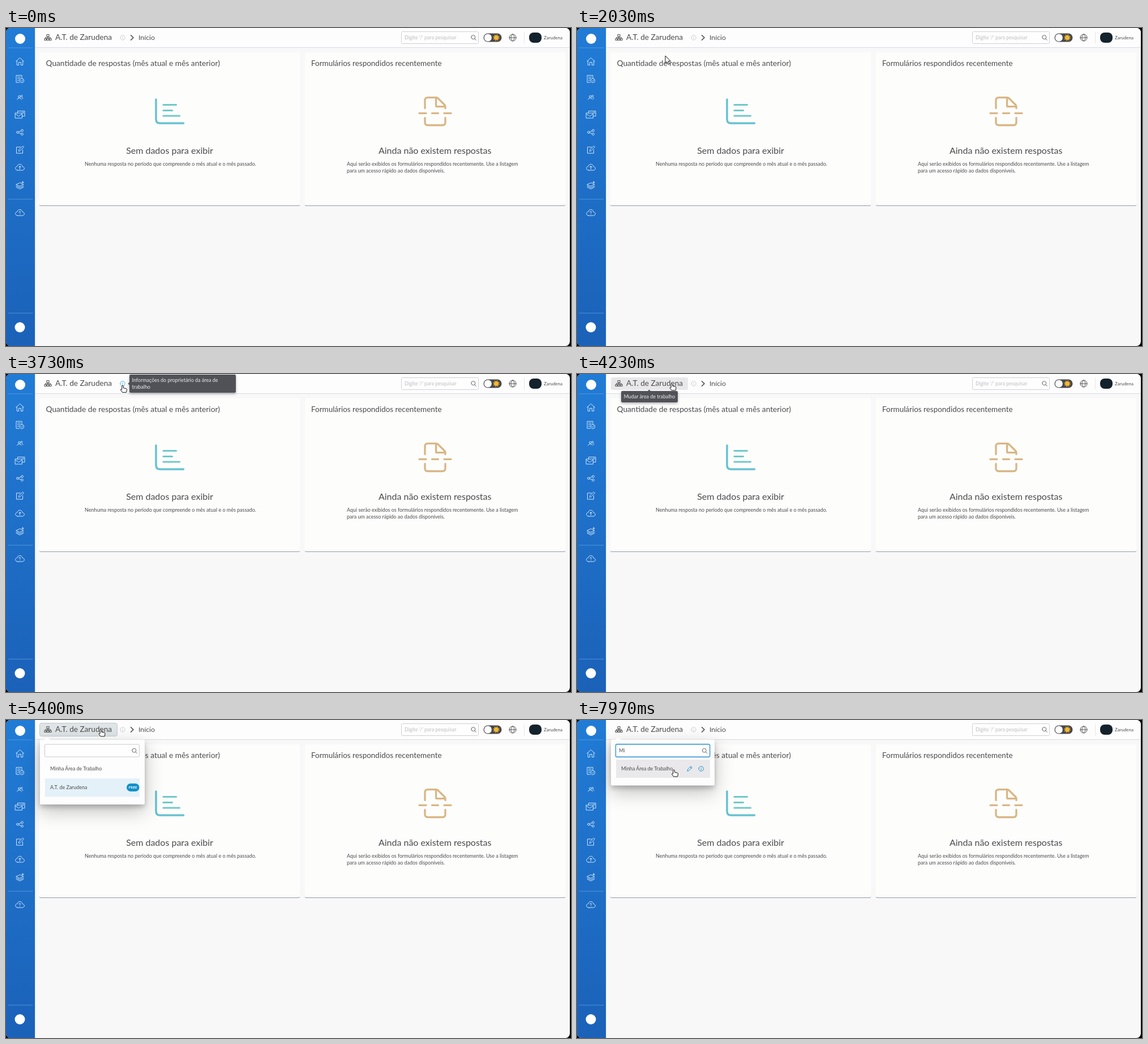
Animation of 998 by 561 pixels, one loop 8000 ms. Source, as an HTML page:

```html
<!DOCTYPE html>
<html lang="pt">
<head>
<meta charset="utf-8">
<title>Início</title>
<style>
html, body { margin: 0; width: 998px; height: 561px; overflow: hidden; background: #000; }
svg { display: block; }
text { font-family: Lato, "Open Sans", sans-serif; fill: #4b4b4d; }
.line { fill: none; stroke-linecap: round; stroke-linejoin: round; }
.card { fill: #fdfdfc; filter: drop-shadow(0 1px .6px rgba(50, 60, 90, .5)); }
.tip { fill: #505257; filter: drop-shadow(0 2px 2px rgba(0, 0, 0, .3)); }
.panel { fill: #fdfdfd; filter: drop-shadow(0 5px 4px rgba(0, 0, 0, .2)) drop-shadow(0 11px 16px rgba(0, 0, 0, .24)); }
</style>
</head>
<body>
<svg id="stage" width="998" height="561" viewBox="0 0 998 561"></svg>
<script>
const LOOP = 8000;
const NAME = 'Zarudena';
const SPACE = 'A.T. de ' + NAME;

const text = (x, y, size, str, extra = '') => `<text x="${x}" y="${y}" font-size="${size}" ${extra}>${str}</text>`;
const rect = (x, y, w, h, fill, extra = '') => `<rect x="${x}" y="${y}" width="${w}" height="${h}" fill="${fill}" ${extra}/>`;
const line = (d, color, width = 1, extra = '') => `<path class="line" d="${d}" stroke="${color}" stroke-width="${width}" ${extra}/>`;
const dot = (x, y, r, fill, extra = '') => `<circle cx="${x}" cy="${y}" r="${r}" fill="${fill}" ${extra}/>`;
const ring = (x, y, r) => `M${x - r} ${y}a${r} ${r} 0 1 0 ${2 * r} 0a${r} ${r} 0 1 0 ${-2 * r} 0`;
const group = (id, body, extra = '') => `<g id="${id}" ${extra}>${body}</g>`;
const glass = (id, x, y) => group(id, line(ring(x - .7, y - .8, 3.5) + `M${x + 2} ${y + 2}l2.4 2.4`, '#666', 1));

// Sidebar icons are drawn around their own centre
const CLOUD = 'M-4 5H4C9 5 9-1 4.5-1.5C4-7-4-7-4.5-2C-9-1.5-9 5-4 5Z';
const ICONS = [
  [59, 'M-7 0L0-6.5L7 0M-5.2-1.5V6.5H-2V1.5H2V6.5H5.2V-1.5'],
  [90, 'M-1 6H-6.5V-6.5H3.5V-1M-4-3.5H1M-4-.5H0M-4 2.5H-2' + ring(3.5, 2.8, 3.7) + 'M2 3L3.2 4.2L5.3 1.7'],
  [122, ring(-1, -1, 1.8) + 'M-5 4Q-4 1.5-1 1.5T3 4' + ring(3, -2, 1.4) + 'M3.5 .5Q5 .7 5.5 2.5'],
  [153, 'M-4-3V-6.5H8.5V2.5H5M-8-3H4V6H-8ZM-8-1.5L-2 2.5L4-1.5M4.5-4.3H6.5V-2.3'],
  [184, ring(-4, 0, 1.9) + ring(4, -3.2, 1.9) + ring(4, 3.2, 1.9) + 'M-2.2-.8L2.2-2.5M-2.2 .8L2.2 2.5'],
  [215, 'M1-5H-6V6H5V0M-2 2L-1.5-.7L5-7L7-5L.6 1.5Z'],
  [246, CLOUD + 'M0 3V-2.5M-2-.5L0-2.5L2-.5'],
  [277, 'M-6.5-1L0-4L6.5-1L0 2ZM-6.5 1.5L0 4.7L6.5 1.5M-6.5 3.7L0 7L6.5 3.7M5-6.5V-3M3.3-4.7H6.8'],
  [326, CLOUD + 'M-1.6-1.3Q-1.2-3.3 .3-2.8Q2.2-1.8 .2-.2V.7M.2 2.6V2.8'],
];

const sidebar = () =>
  rect(0, 0, 51, 561, 'url(#blue)') +
  [35, 302, 503].map(y => line(`M4 ${y}H47`, '#5b9fe0', .8)).join('') +
  dot(25, 19, 9, '#fff') + dot(24.5, 528, 9, '#fff') +
  ICONS.map(([y, d]) => line(d, '#cfe4f8', 1, `transform="translate(24.5 ${y})"`)).join('');

const header = () =>
  rect(51, 0, 947, 34, '#fdfdfd') + line('M51 34.5H998', '#d9dbe2') +
  rect(60, 6, 136, 22, '#e8e8ea', 'id="hover" rx="3"') +
  rect(59.5, 5.5, 137, 23, '#dfe4e6', 'id="active" rx="3" stroke="#bccbcc"') +
  line('M72 11.5h4v3.5h-4ZM68 18.5h3.2v3h-3.2ZM72.4 18.5h3.2v3h-3.2ZM76.8 18.5h3.2v3h-3.2ZM74 15V18.5M69.6 18.5V16.8H78.4V18.5', '#555', 1.1) +
  text(87, 21.3, 13.6, SPACE) +
  group('info', line(ring(206, 17, 4.2) + 'M206 16.7V19M206 15V15.1', 'currentColor', .9)) +
  line('M220.5 12.7L225 17L220.5 21.3', '#444', 1.5) +
  text(234, 21, 12.3, 'Início') +
  rect(698.5, 6.5, 136, 21, '#fefefe', 'rx="2" stroke="#cfd0d6"') +
  text(704, 19.6, 8.9, 'Digite \'/\' para pesquisar', 'style="fill:#bdbdc2"') +
  glass('find', 826, 17) +
  rect(843.5, 9.5, 32, 15, '#47484b', 'rx="7.5"') + dot(851.3, 17, 6.6, '#fdfdfd') +
  dot(866, 17, 4, '#f5b82e') + dot(866, 17, 5, 'none', 'stroke="#f5b82e" stroke-width="1.4" stroke-dasharray="1.6 2.33"') +
  line(ring(895, 17, 6) + 'M889 17H901M895 11C891 14 891 20 895 23C899 20 899 14 895 11', '#555', 1) +
  line('M915.5 7V27', '#e6e6ea') +
  rect(924, 8, 22, 18, '#14222c', 'rx="8"') +
  text(950, 19.6, 7.9, NAME);

const cards = () =>
  [59, 528].map(x => rect(x, 43, 460, 270, '#fdfdfc', 'class="card" rx="2"')).join('') +
  text(70.5, 67, 13.72, 'Quantidade de respostas (mês atual e mês anterior)') +
  text(539, 67, 13.47, 'Formulários respondidos recentemente') +
  line('M265 126V161Q265 168 272 168H313.5', '#66c2d2', 3.5) +
  line('M278 135.5H300.5M278 145.5H293.5M278 155H306.5', '#70c8c9', 3.2) +
  line('M740 141.5V127.5Q740 122.6 745 122.6H760Q761.5 122.6 763 124L774.6 135.5Q776 137 776 138.5V141.5M759.6 123V137Q759.6 138.7 761.3 138.7H775.5M740 158.5V166.6Q740 171.5 745 171.5H771Q776 171.5 776 166.6V158.5M730 150.3H742M752.5 150.3H763.5M774 150.3H786', '#d9b684', 3.3) +
  text(289, 221.7, 16, 'Sem dados para exibir', 'text-anchor="middle"') +
  text(757.7, 221.7, 16, 'Ainda não existem respostas', 'text-anchor="middle"') +
  text(139, 243, 8.96, 'Nenhuma resposta no período que compreende o mês atual e o mês passado.') +
  text(602, 243, 8.96, 'Aqui serão exibidos os formulários respondidos recentemente. Use a listagem') +
  text(602, 255, 8.96, 'para um acesso rápido ao dados disponíveis.');

const white = 'style="fill:#ececee"';
const tooltips = () =>
  group('tipInfo', '<path class="tip" d="M220 1H404Q406 1 406 3V31Q406 33 404 33H220Q218 33 218 31V19.5L215.5 17L218 14.5V3Q218 1 220 1Z"/>' +
    text(222.5, 14, 8.95, 'Informações do proprietário da área de', white) + text(222.5, 26, 8.95, 'trabalho', white)) +
  group('tipSpace', '<path class="tip" d="M80 30H125L127.5 27.5L130 30H176Q178 30 178 32V48Q178 50 176 50H80Q78 50 78 48V32Q78 30 80 30Z"/>' +
    text(128, 43, 8.87, 'Mudar área de trabalho', white + ' text-anchor="middle"'));

const dropdown = () => group('menu',
  rect(60, 34.5, 185, 114.5, '#fdfdfd', 'id="panel" class="panel" rx="2"') +
  '<path d="M67 35L72.5 30.5L78 35Z" fill="#fdfdfd"/>' +
  rect(68, 42.5, 168, 23, 'none', 'id="glow" rx="3" stroke="#c6e0f5" stroke-width="2.4"') +
  rect(68.5, 43, 167, 22, '#fefefe', 'id="field" rx="2"') +
  text(74, 57.3, 9, '', 'id="typed"') + line('', '#333', .9, 'id="caret"') +
  glass('menuFind', 227, 54.5) +
  group('rowHover', rect(69, 70, 166, 32, '#e9e9eb') +
    line('M195 90L195.7 87L201 81.7L203.2 83.8L197.9 89.2ZM199.8 83L202 85.1', '#2c93d0', 1) +
    line(ring(219.3, 86, 4.3) + 'M219.3 85.6V88.2M219.3 83.8V83.9', '#2c93d0', 1)) +
  text(78, 89, 8.8, 'Minha Área de Trabalho') +
  group('rowSpace', rect(69, 103, 167, 32.5, '#e4f1f9') + text(78, 122, 8.9, SPACE) +
    rect(213, 112, 22.5, 14, '#1290ca', 'rx="7"') +
    text(224.2, 121.4, 6.3, 'FREE', 'font-weight="700" text-anchor="middle" style="fill:#fff"')));

const BEAM = 'M-2.8-5.5H2.8M0-5.5V5.5M-2.8 5.5H2.8';
const POINTER = 'stroke="#111" fill="#fff" stroke-linejoin="round"';
const cursors = () => group('cursor',
  `<path id="arrow" d="M0 0V13.2L3 10.4L5.2 15.4L7.4 14.4L5.2 9.6H9.3Z" ${POINTER}/>` +
  `<path id="hand" d="M-1.3 1Q0-.7 1.3 1V4.6L6.3 5.7Q7.6 6.1 7.5 7.7L6.6 12.4H-.4L-3.6 8Q-3.4 6.3-1.3 7.4Z" ${POINTER}/>` +
  group('beam', line(BEAM, '#fff', 3.4) + line(BEAM, '#111', 1.6)));

const stage = document.getElementById('stage');
stage.innerHTML =
  `<defs><linearGradient id="blue" x2="0" y2="1"><stop stop-color="#217cd6"/><stop offset="1" stop-color="#1b61b8"/></linearGradient>
   <clipPath id="window"><rect width="996" height="561" rx="8"/></clipPath></defs>` +
  group('app', rect(0, 0, 998, 561, '#f8f8f9') + cards() + header() +
    line('M51.5 0V561', '#dfe3ea') + sidebar() + dropdown() + tooltips() + cursors(), 'clip-path="url(#window)"');

const el = {};
stage.querySelectorAll('[id]').forEach(node => el[node.id] = node);
const set = (id, attrs) => { for (const k in attrs) el[id].setAttribute(k, attrs[k]); };
const fade = (id, v) => set(id, { opacity: v });

const ramp = (t, a, b) => Math.min(1, Math.max(0, (t - a) / (b - a)));
const smooth = u => u * u * (3 - 2 * u);
const pulse = (t, a, b, c, d) => ramp(t, a, b) * (1 - ramp(t, c, d));

// Pointer moves: start, end, from, to
const MOVES = [
  [1600, 2030, [100, 570], [156, 49]],
  [2030, 2430, [156, 49], [206, 20]],
  [3740, 4030, [206, 20], [167.5, 16.5]],
  [5600, 5850, [167.5, 16.5], [166, 57.5]],
  [7490, 7850, [166, 57.5], [171, 87.5]],
];

function pointer(t) {
  const [a, b, p, q] = MOVES.filter(m => t >= m[0]).pop() || MOVES[0];
  const u = smooth(ramp(t, a, b));
  return [p[0] + (q[0] - p[0]) * u, p[1] + (q[1] - p[1]) * u];
}

function render(t) {
  const [x, y] = pointer(t);
  const opened = t >= 4700, filtered = t >= 6800, focused = t >= 5870;
  const onButton = t > 3730 && x < 196 && y < 29;
  const onInfo = x > 200 && y < 23;
  const onField = opened && y > 43 && y < 66;
  const onRow = opened && y > 70;

  set('cursor', { transform: `translate(${x} ${y})` });
  const kind = onField ? 'beam' : onButton || onInfo || onRow ? 'hand' : 'arrow';
  ['arrow', 'hand', 'beam'].forEach(id => fade(id, +(id === kind && t >= 1600)));

  el.info.style.color = onInfo ? '#45a9e2' : '#c9c9ce';
  fade('hover', +(onButton && !opened));
  fade('active', pulse(t, 4700, 4800, 5660, 5800));
  fade('tipInfo', pulse(t, 2500, 2700, 3760, 3900));
  fade('tipSpace', pulse(t, 4030, 4200, 4700, 4800));

  const open = smooth(ramp(t, 4710, 4860));
  set('menu', { opacity: open, transform: `translate(0 ${34.5 * .2 * (1 - open)}) scale(1 ${.8 + .2 * open})` });
  set('panel', { width: filtered ? 183 : 185, height: filtered ? 81 : 114.5 });
  set('field', { width: filtered ? 166 : 167, stroke: focused ? '#439add' : '#c9cad0', 'stroke-width': focused ? 1.3 : 1 });
  set('glow', { width: filtered ? 167 : 168, opacity: ramp(t, 5870, 5930) });
  set('menuFind', { transform: `translate(${filtered ? -1.5 : 0} 0)` });
  fade('rowSpace', +!filtered);
  fade('rowHover', +onRow);

  const typed = 'Mi'.slice(0, (t >= 6770) + (t >= 6970));
  if (el.typed.textContent !== typed) el.typed.textContent = typed;
  const caretX = 74.5 + (typed ? el.typed.getComputedTextLength() : 0);
  set('caret', { d: `M${caretX} 49.5V59.5` });
  fade('caret', +((t >= 5870 && t < 6370) || (t >= 6770 && t < 7470)));
}

function tick() {
  render(performance.now() % LOOP);
  requestAnimationFrame(tick);
}
tick();
</script>
</body>
</html>
```
